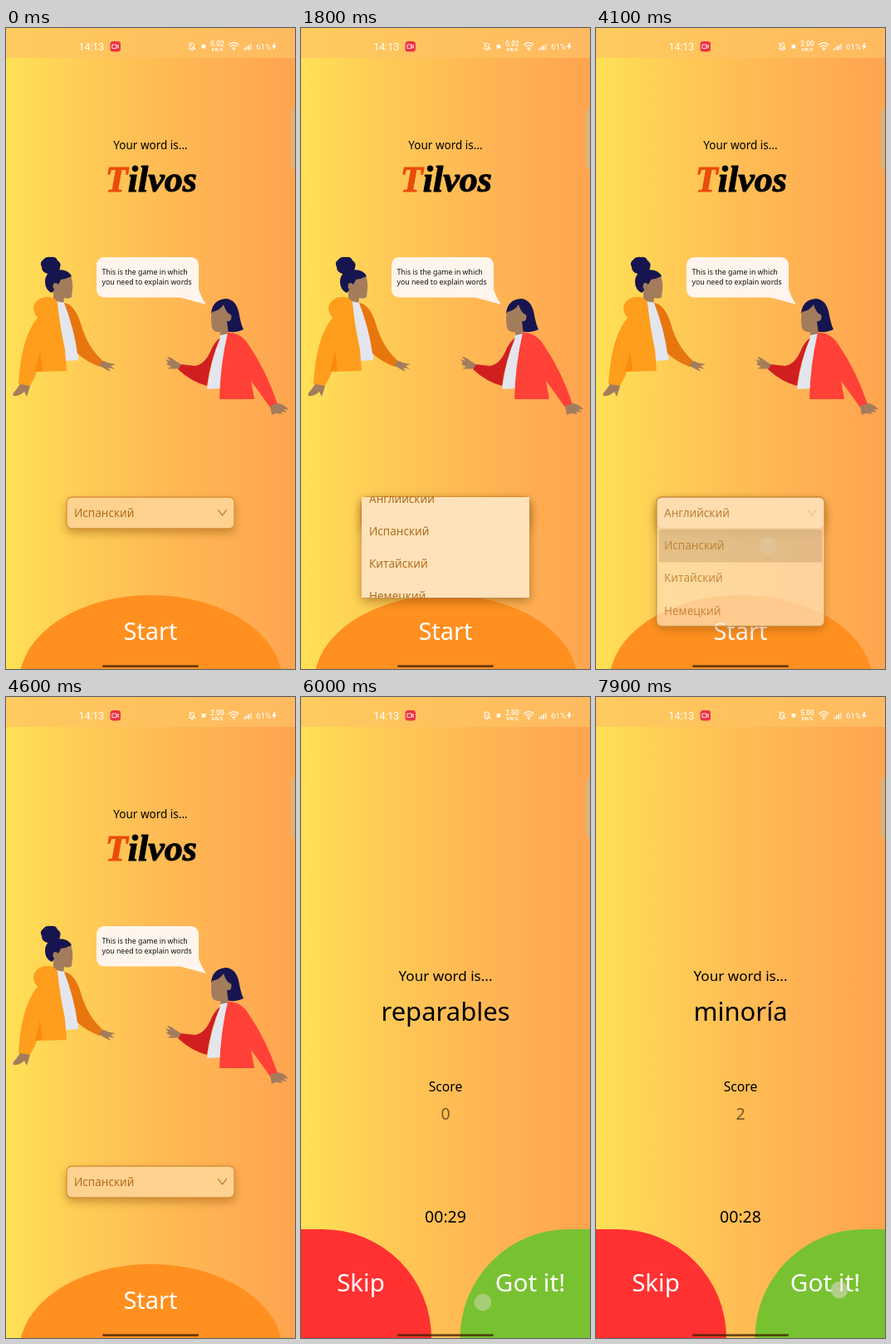
An HTML page with a canvas that plays this animation: 348 px wide and 772 px high, repeating every 8000 ms.

```html
<!DOCTYPE html>
<html lang="en">
<head>
<meta charset="utf-8">
<title>Word game</title>
<style>
  html, body { margin: 0; width: 100%; height: 100%; overflow: hidden; background: #ffc055; }
  canvas { display: block; width: 348px; height: 772px; }
</style>
</head>
<body>
<canvas id="stage"></canvas>
<script>
const W = 348, H = 772, LOOP = 8000;
const canvas = document.getElementById('stage');
const ctx = canvas.getContext('2d');
const ratio = window.devicePixelRatio || 1;
canvas.width = W * ratio;
canvas.height = H * ratio;
ctx.scale(ratio, ratio);

const SANS = '"Noto Sans", "Open Sans", sans-serif';
const ROBOTO = 'Roboto, sans-serif';
const LANGUAGES = ['Английский', 'Испанский', 'Китайский', 'Немецкий'];
const BOX = { x: 73, y: 565, w: 202, h: 37.8, full: 155.5, row: 39.2 };
const SKIN = '#a37c5c', HAIR = '#17154f', BROWN = '#b06c1c';

const MENUS = [
  { open: 1642, press: 2280, close: 2350, row: 0 },
  { open: 2770, press: 3900, close: 4020, row: 1 }
];
const FADE = 280;
const TOUCHES = [
  { from: 1500, to: 1640, x: 190, y: 585 },
  { from: 2280, to: 2450, x: 200, y: 584 },
  { from: 2640, to: 2770, x: 200, y: 585 },
  { from: 3900, to: 4160, x: 207, y: 623 },
  { from: 5790, to: 6100, x: 219, y: 729 },
  { from: 6500, to: 6680, x: 262, y: 722 },
  { from: 7200, to: 7380, x: 275, y: 718 },
  { from: 7850, to: 8100, x: 293, y: 714 }
];

const clamp = v => Math.max(0, Math.min(1, v));
const easeOut = v => 1 - (1 - v) ** 2;

function text(str, x, y, size, color, align = 'center', family = SANS, style = '') {
  ctx.font = `${style} ${size}px ${family}`;
  ctx.textAlign = align;
  ctx.fillStyle = color;
  ctx.fillText(str, x, y);
}

function shape(color, d) {
  ctx.fillStyle = color;
  ctx.fill(new Path2D(d));
}

function line(color, width, d) {
  ctx.strokeStyle = color;
  ctx.lineWidth = width;
  ctx.lineCap = ctx.lineJoin = 'round';
  ctx.stroke(new Path2D(d));
}

function disc(color, x, y, rx, ry = rx) {
  ctx.fillStyle = color;
  ctx.beginPath();
  ctx.ellipse(x, y, rx, ry, 0, 0, Math.PI * 2);
  ctx.fill();
}

function panel(color, x, y, w, h, r) {
  ctx.fillStyle = color;
  ctx.beginPath();
  ctx.roundRect(x, y, w, h, r);
  ctx.fill();
}

// Shadow outside the panel only, so a translucent panel is not darkened.
function dropShadow(x, y, w, h, r, color, blur, dy) {
  ctx.save();
  ctx.beginPath();
  ctx.rect(0, 0, W, H);
  ctx.roundRect(x, y, w, h, r);
  ctx.clip('evenodd');
  ctx.shadowColor = color;
  ctx.shadowBlur = blur * ratio;
  ctx.shadowOffsetY = dy * ratio;
  panel('#000', x, y, w, h, r);
  ctx.restore();
}

function across(...colors) {
  const g = ctx.createLinearGradient(0, 0, W, 0);
  colors.forEach((c, i) => g.addColorStop(i / (colors.length - 1), c));
  return g;
}

function background() {
  ctx.fillStyle = across('#ffe156', '#ffcd56', '#ffbd54', '#ffb053', '#ffa44f');
  ctx.fillRect(0, 0, W, H);
}

function statusBar(t) {
  ctx.fillStyle = across('#ffcb5f', '#ffc15e', '#ffba60');
  ctx.fillRect(0, 0, W, 36);
  text('14:13', 87.5, 26.5, 12.3, '#fff', 'left', ROBOTO);
  panel('#ee3345', 125.5, 16, 12.5, 12.5, 3.5);
  ctx.strokeStyle = '#fff';
  ctx.lineWidth = 0.8;
  ctx.strokeRect(128.3, 20, 4.7, 4.5);
  line('#fff', 0.8, 'M133 22l2.3-1.5v3.4z');

  line('#fff', 1, 'M220.5 25h7l-1-1.8v-2.5q0-2.7-2.5-2.7t-2.5 2.7v2.5zM223 26.6h2M220 18l8 8');
  panel('#fff', 235.7, 20, 4.5, 4.5, 0);
  const speed = t < 2500 ? '0.02' : t < 7000 ? '2.00' : '5.00';
  text(speed, 254.5, 22, 8.3, '#fff', 'center', ROBOTO, '500');
  text('KB/S', 254.5, 28.3, 6.1, '#fff', 'center', ROBOTO, '500');
  line('#fff', 1.2, 'M268.7 20q5.6-4.6 11.2 0M270.6 22.3q3.7-2.8 7.4 0M272.4 24.5q1.9-1.3 3.8 0');
  disc('#fff', 274.3, 26.2, 1);
  for (let i = 0; i < 4; i++) {
    panel(i < 3 ? '#fff' : 'rgba(255,255,255,.6)', 286 + i * 2.7, 24.5 - i * 1.9, 1.7, 2 + i * 1.9, 0.5);
  }
  text('61%', 301, 26, 9.8, '#fff', 'left', ROBOTO);
  shape('#fff', 'M323 18l-3 5h2.3l-.8 3.8 4.3-5.2h-2.5l1-3.6z');
}

function chrome(t) {
  statusBar(t);
  panel('rgba(203,187,145,.62)', 342.5, 97.5, 12, 72, 4);
  panel('rgba(60,32,0,.75)', 116, 767.3, 116, 2.6, 1.3);
}

function leftWoman() {
  // hair and head
  shape(HAIR, 'M43 288Q40 282 45 279Q48 275 54 276Q60 275 62 280Q67 283 65 289Q64 295 58 296L50 296Q43 294 43 288Z');
  shape(SKIN, 'M57 301L78 298Q81 307 80 315L79 324Q76 327 70 325L69 334L57 331Z');
  shape(HAIR, 'M47 306Q47 294 59 292Q74 289 79 299Q73 302 66 303Q64 309 60 310Q58 317 55 319Q47 315 47 306Z');
  disc(SKIN, 59.5, 311, 3, 4);
  // shirt and jacket
  shape('#e4e6ee', 'M60 329L71 331Q80 356 87 382L87 400L71 401Z');
  shape('#e8760f', 'M70 331Q83 333 90 356Q98 385 118 402L113 408Q97 402 86 392Q82 362 70 331Z');
  shape('#ff9d1c', 'M34 333Q39 323 52 324Q60 325 62 331Q65 360 71 387L73 413L37 414Q35 421 28 432L15 429Q18 373 38 349Q31 341 34 333Z');
  shape('#fb8b0c', 'M35 414L41 388L44 413Z');
  // hands
  shape(SKIN, 'M114 402Q119 400 122 403L132 405L126 407L131 411L123 409L126 414Q120 411 113 407Z');
  shape(SKIN, 'M17 429L29 431Q27 438 25 444L22 438Q16 444 9 443Q7 441 12 436Z');
}

function rightWoman() {
  // hair and head
  shape(HAIR, 'M247 343Q249 327 265 326Q278 327 281 346Q283 357 286 363Q277 368 262 365Z');
  shape(SKIN, 'M248 342Q258 340 262 333Q264 340 268 344Q273 345 271 351Q269 354 266 353L268 369L258 371L258 366Q250 367 248 361Q246 351 248 342Z');
  // shirt and jacket
  shape('#e4e6ee', 'M258 370L268 368L264 395L258 434L242 435Q247 400 258 370Z');
  shape('#d11f20', 'M258 373Q250 379 246 390Q239 405 228 407L210 405L207 411Q223 426 242 431Q246 401 258 373Z');
  shape('#ff4137', 'M267 367Q283 366 293 383Q313 412 327 453L318 457Q307 441 295 425L299 447L257 447Q258 405 267 367Z');
  // hands
  shape(SKIN, 'M211 405L204 401Q198 396 194 396L198 401L192 399L195 403L193 405L199 408L194 410Q202 411 208 410Z');
  shape(SKIN, 'M318 455L328 452Q337 454 340 460L334 459L338 463L331 462L333 465L325 464L320 466Z');
}

function bubble() {
  panel('#fff5ec', 109, 276, 123, 48.5, 9);
  shape('#fff5ec', 'M208 324L241 333Q234 323 231 311Z');
  text('This is the game in which', 115.5, 297.3, 8.75, '#111', 'left');
  text('you need to explain words', 115.5, 309, 8.75, '#111', 'left');
}

function logo() {
  const style = 'italic bold', family = '"Liberation Serif", serif', size = 44;
  ctx.font = `${style} ${size}px ${family}`;
  const start = 174 - ctx.measureText('Tilvos').width / 2;
  const first = ctx.measureText('T').width;
  const part = (str, x, color) => {
    text(str, x, 197, size, color, 'left', family, style);
    ctx.strokeStyle = color;
    ctx.lineWidth = 1.1;
    ctx.strokeText(str, x, 197);
  };
  part('T', start, '#ea4c0b');
  part('ilvos', start + first, '#000');
}

function outline(h, color) {
  ctx.strokeStyle = color;
  ctx.lineWidth = 1.3;
  ctx.beginPath();
  ctx.roundRect(BOX.x, BOX.y, BOX.w, h, 6);
  ctx.stroke();
}

function selectBox(t) {
  dropShadow(BOX.x, BOX.y, BOX.w, BOX.h, 6, 'rgba(125,70,0,.45)', 12, 5);
  panel('#ffd290', BOX.x, BOX.y, BOX.w, BOX.h, 6);
  outline(BOX.h, '#dc9138');
  const picked = t >= 2600 && t < 4300 ? 0 : 1;
  text(LANGUAGES[picked], 82, 589, 13.5, BROWN, 'left');
  line(BROWN, 1.2, 'M255.5 580.5L260.5 587L265.5 580.5');
}

function menu(t) {
  const m = MENUS.find(v => t >= v.open && t < v.close + FADE);
  if (!m) return;
  const grow = easeOut(clamp((t - m.open) / 300));
  const h = BOX.full * grow;
  const lift = (BOX.full - h) / 2;
  const moving = grow < 1;
  const radius = moving ? 0 : 6;
  ctx.save();
  ctx.globalAlpha = 1 - clamp((t - m.close) / FADE);
  dropShadow(BOX.x, BOX.y, BOX.w, h, radius, 'rgba(110,60,0,.5)', 12, 4);
  panel('#ffe2ba', BOX.x, BOX.y, BOX.w, h, radius);
  if (!moving) outline(BOX.full, '#c98a3e');
  ctx.beginPath();
  ctx.rect(BOX.x, BOX.y - 1, BOX.w, h + 1);
  ctx.clip();
  if (t >= m.press) {
    panel('rgba(115,85,45,.28)', BOX.x + 2.5, BOX.y + m.row * BOX.row, BOX.w - 5, BOX.row, 2);
  }
  LANGUAGES.forEach((name, i) => {
    text(name, 82, 589 + i * BOX.row - lift, 13.5, BROWN, 'left');
  });
  ctx.restore();
}

function homePage(t) {
  background();
  text('Your word is...', 174, 146, 13.5, '#000');
  logo();
  leftWoman();
  rightWoman();
  bubble();
  disc('#ff9020', 174.5, 788, 158.5, 105);
  text('Start', 174, 737, 29, '#fff');
  selectBox(t);
  menu(t);
}

function gamePage(t) {
  background();
  const score = t < 6600 ? 0 : t < 7300 ? 1 : 2;
  text('Your word is...', 174, 342, 17.1, '#000');
  text(['reparables', 'vestuario', 'minoría'][score], 174, 390, 31, '#000');
  text('Score', 174, 474.5, 15.7, '#000');
  text(score, 174, 509, 19.5, 'rgba(0,0,0,.54)');
  text(t < 7000 ? '00:29' : '00:28', 174, 633, 19.5, '#000');
  shape('#ff3131', 'M0 641H26A131 131 0 0 1 157 772H0Z');
  shape('#78c232', 'M348 641H322A131 131 0 0 0 191.5 772H348Z');
  text('Skip', 72, 716, 29.5, '#fff');
  text('Got it!', 276, 716, 29.7, '#fff');
}

function touches(t) {
  for (const p of TOUCHES) {
    if (t < p.from || t >= p.to) continue;
    const alpha = 0.55 * clamp((p.to - t) / 120);
    disc(`rgba(226,218,205,${alpha})`, p.x, p.y, 10.3);
  }
}

function draw(t) {
  const page = clamp((t - 5820) / 150);
  if (page < 1) homePage(t);
  if (page > 0) {
    ctx.globalAlpha = page;
    gamePage(t);
    ctx.globalAlpha = 1;
  }
  chrome(t);
  touches(t);
}

const begin = performance.now();
function tick() {
  draw((performance.now() - begin) % LOOP);
  requestAnimationFrame(tick);
}
tick();
</script>
</body>
</html>
```
